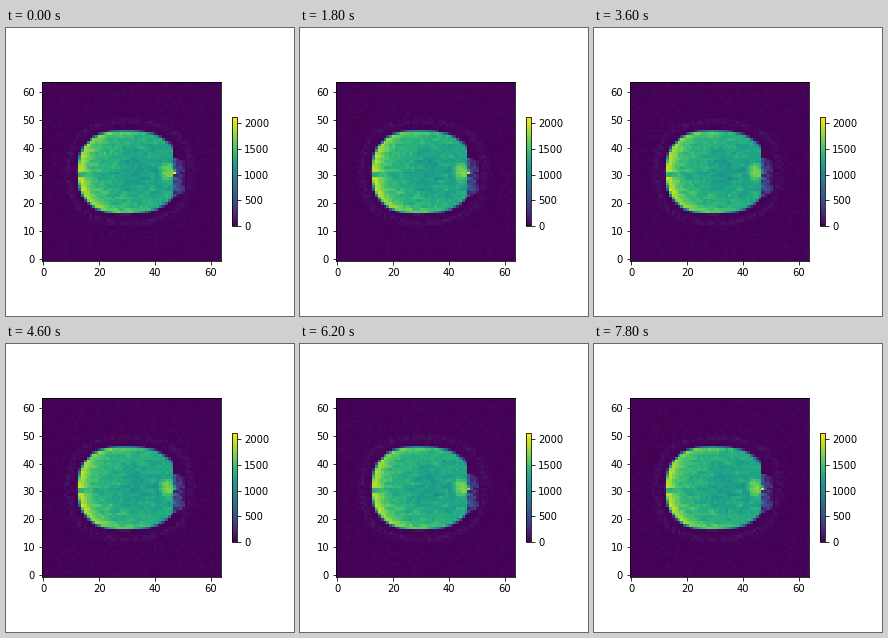
A matplotlib script for the animation above (8 s loop, 288 by 288 pixels).

```python
import numpy as np
import matplotlib.pyplot as plt
from matplotlib.animation import FuncAnimation

SIZE = 64
FRAMES, STEP = 40, 200
VMAX = 2127
FLASH = 28          # step at which the scan restarts with full signal

CX, CY = 29, 31.25  # widest point of the head
BACK, FRONT, HALF = 16.5, 19.6, 14.8

y, x = np.mgrid[0:SIZE, 0:SIZE].astype(float)
rng = np.random.default_rng(12)


def bump(cx, cy, rx, ry, power=2):
    r = np.hypot((x - cx) / rx, (y - cy) / ry)
    return np.exp(-r ** power)


def smooth(a, axis):
    return (np.roll(a, 1, axis) + 2 * a + np.roll(a, -1, axis)) / 4


def texture():
    return rng.normal(0, 1, (SIZE, SIZE))


# superellipse radius: 1 on the brain's outline
u = np.abs(x - CX) / np.where(x < CX, BACK, FRONT)
v = np.abs(y - CY) / HALF
rho = (u ** 2.5 + v ** 2.5) ** 0.4
edge = (1 - rho) * HALF
depth = np.maximum(edge, 0)
cover = np.clip(edge + 0.5, 0, 1) * (x <= 46)
leftness = np.clip((46 - x) / 30, 0, 1)

grain = texture()
streak = smooth(smooth(texture(), 1), 1)
clump = smooth(smooth(texture(), 0), 1)


def brain():
    level = 1230 + 130 * leftness
    level += 480 * np.exp(-depth / 2.2) * (0.1 + leftness)
    level += 260 * np.exp(-np.abs(x - 13) / 4)
    level -= 110 * bump(32, 31.5, 6, 7)
    level -= 120 * bump(41, 31.5, 1.5, 6)
    level += 430 * bump(44.3, 31.5, 2.7, 3, 4)
    level += 28 * grain + 75 * streak + 45 * clump
    level -= 150 * bump(18, 30.5, 9, 0.9)
    level -= 800 * bump(13, 30.5, 2, 0.8)
    return level * cover


def surroundings():
    skull = np.exp(-((rho - 1.22) / 0.06) ** 2)
    level = 18 + 110 * skull * rng.uniform(0, 1, rho.shape)
    front = (x > 46) & (x <= 50) & (np.abs(y - 29.5) < 7.5 - 0.5 * (x - 47))
    level += front * rng.uniform(150, 780, rho.shape) * (52 - x) / 5
    return level * (1 - cover)


def fluid():
    """Extra signal of the first volume: ventricles, sulci and front spot."""
    dx, dy = np.abs(x - 34.5), np.abs(y - 31.4)
    arms = (np.abs(dy - 0.5 - 0.07 * dx ** 2) < 1.35) & (dx < 7)
    sulci = np.clip(0.4 + 1.6 * clump + 0.4 * grain, 0, 1.3)
    rim = np.exp(-(depth / 3) ** 2) * (0.2 + leftness) * sulci
    back = np.exp(-((x - 13) / 4) ** 2) * (0.3 + 0.5 * sulci)
    spot = bump(44.5, 31.4, 3.4, 2.2, 3)
    return (1200 * arms + 750 * rim + 550 * back + 1000 * spot + 40) * cover


BASE = brain() + surroundings()
FLUID = fluid()


def head_drift(i):
    """Slow head motion, building up before the restart and settling after."""
    if i < FLASH:
        return np.exp(-((i - 19) / 6) ** 2)
    return 0.4 * np.exp(-(i - FLASH) / 5)


def volume(i):
    noise = np.random.default_rng(100 + i)
    drift = head_drift(i)
    excess = 0.1 ** (i - FLASH) if i >= FLASH else 0
    level = BASE + FLUID * excess
    level += noise.normal(0, 22, level.shape) * (0.4 + cover)
    level[31, 47] = 2080 - 1150 * drift
    level[32, 47] = 1250 - 300 * drift
    return np.abs(level)


fig = plt.figure(figsize=(4, 4), dpi=72, facecolor="white")
fig.subplots_adjust(left=0.125, right=0.9, bottom=0.125, top=0.88)
ax = fig.add_subplot()
image = ax.imshow(volume(0), origin="lower", cmap="viridis", vmin=0, vmax=VMAX,
                  interpolation="nearest")
ax.set_xticks(range(0, 61, 20))
ax.set_yticks(range(0, 61, 10))
fig.colorbar(image, ax=ax, shrink=0.5, ticks=range(0, 2001, 500))


def update(i):
    image.set_data(volume(i))
    return [image]


anim = FuncAnimation(fig, update, frames=FRAMES, interval=STEP,
                     repeat=True, repeat_delay=0)
plt.show()
```
